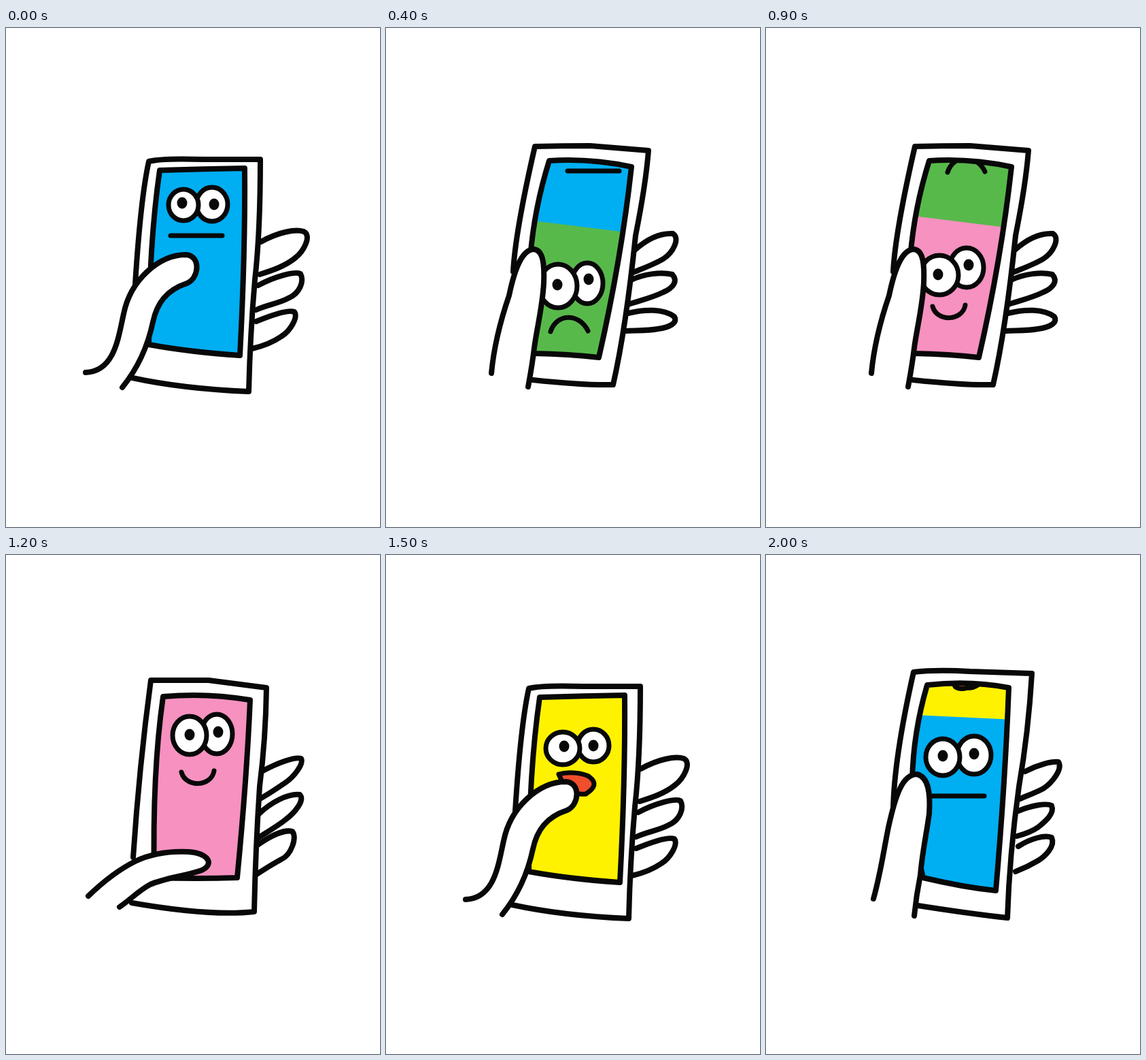
Write an HTML page with a canvas that moves like this. It is 550 px wide and 733 px high and loops after 2100 ms.

```html
<!DOCTYPE html>
<html lang="en">
<head>
<meta charset="utf-8">
<title>Swiping faces</title>
<style>
html, body { margin: 0; width: 100%; height: 100%; overflow: hidden; background: #fff; }
canvas { display: block; }
</style>
</head>
<body>
<canvas id="stage" width="550" height="733"></canvas>
<script>
const ctx = document.getElementById('stage').getContext('2d');
const INK = '#080808', RED = '#f04e2c';
const colors = ['#00aef2', '#58b94b', '#f691c0', '#fff200'];

// All poses share the same path commands, so any two can be blended.
const rest = {
  body: 'M190 376 Q198 250 210 196 Q230 191 290 193 L374 193 Q374 300 366 370 Q359 450 357 534 Q260 530 186 514',
  screen: 'M226 209 Q290 207 351 206 Q352 330 344 481 Q270 476 210 465 Q210 320 226 209Z',
  thumb: 'M117 506 C160 504 165 455 173 420 C183 370 225 333 265 333 C287 335 284 368 266 375 C236 385 222 404 216 432 C208 470 192 502 171 528',
  fingers: 'M375 314 C400 300 425 295 438 299 C450 305 438 328 425 338 C410 350 392 356 373 362 ' +
    'M371 378 C395 365 425 357 433 361 C439 372 432 390 415 397 C400 405 385 406 368 414 ' +
    'M368 431 C390 422 415 413 424 417 C430 425 418 445 405 453 C392 462 375 468 362 471'
};
const low = {
  body: 'M187 444 Q196 310 213 184 Q255 184 298 184 L383 195 Q382 270 373 340 Q367 430 365 524 Q300 531 185 511',
  screen: 'M231 208 Q295 202 359 213 Q354 330 340 474 Q280 476 218 474 Q215 320 231 208Z',
  thumb: 'M121 501 C150 473 170 460 190 450 C215 438 245 435 268 436 C296 438 308 453 288 463 C262 472 235 474 212 484 C195 493 182 507 167 517',
  fingers: 'M376 318 C400 305 425 296 434 299 C438 306 425 325 410 335 C395 345 385 352 372 359 ' +
    'M371 381 C390 363 415 350 432 352 C440 360 425 378 412 388 C400 398 385 406 370 416 ' +
    'M370 426 C390 412 410 403 421 406 C428 415 420 440 405 447 C390 455 378 463 367 470'
};
const push = {
  body: 'M186 385 Q198 250 213 177 Q260 178 300 181 L388 197 Q391 225 373 300 Q354 430 348 526 Q290 527 188 514',
  screen: 'M240 197 Q300 199 360 214 Q347 330 337 482 Q280 481 216 474 Q212 330 240 197Z',
  thumb: 'M139 496 C150 460 170 430 184 400 C196 368 215 333 236 333 C249 336 251 365 246 382 C238 405 226 425 218 452 C208 482 202 497 188 516',
  fingers: 'M372 322 C390 309 410 301 423 302 C432 312 420 328 405 336 C390 344 378 349 364 358 ' +
    'M366 380 C385 367 410 357 421 359 C427 370 415 388 402 395 C388 402 375 406 361 413 ' +
    'M361 431 C380 420 410 412 425 416 C431 428 415 442 402 447 C388 452 375 455 358 462'
};
const high = {
  body: 'M187 358 Q190 300 219 174 Q260 173 300 173 L386 180 Q382 230 367 305 Q353 440 334 524 Q290 525 216 517',
  screen: 'M240 195 Q300 191 361 204 Q346 340 313 484 Q270 479 217 478 Q196 335 240 195Z',
  thumb: 'M155 507 C159 465 170 425 181 393 C190 350 201 325 218 325 C232 327 233 350 232 375 C230 410 222 440 218 470 C215 495 213 505 209 527',
  fingers: 'M366 326 C385 309 405 301 422 302 C433 309 422 330 408 339 C395 347 378 353 361 360 ' +
    'M361 370 C380 361 405 358 421 362 C430 372 422 382 408 388 C392 396 375 400 356 406 ' +
    'M356 419 C380 413 408 412 424 424 C430 434 415 440 400 442 C385 445 365 444 352 445'
};
const finish = {
  body: 'M187 375 Q188 300 217 172 Q250 168 300 171 L391 174 Q386 260 372 340 Q358 440 355 533 Q300 527 217 514',
  screen: 'M237 191 Q300 184 357 195 Q352 330 338 493 Q290 488 231 474 Q196 330 237 191Z',
  thumb: 'M158 505 C168 470 172 440 180 400 C190 355 200 322 222 322 C239 326 242 350 240 380 C236 410 230 435 227 470 C222 495 220 510 218 530',
  fingers: 'M381 318 C400 308 420 303 430 304 C437 315 420 335 408 343 C395 350 385 353 374 358 ' +
    'M371 376 C390 368 412 364 420 368 C425 380 410 392 400 400 C390 407 380 410 369 413 ' +
    'M371 428 C390 416 410 411 420 415 C426 428 410 443 400 449 C390 455 380 460 367 465'
};

const midway = (a, b) => {
  const to = b.match(/\d+/g);
  let n = 0;
  return a.replace(/\d+/g, v => (+v + +to[n++]) / 2);
};
const between = {};
for (const part in rest) between[part] = midway(rest[part], low[part]);
const poses = [rest, between, low, push, high, finish];

// Mouth x, y, then each eye as x, y, rx, ry, pupil x, pupil y.
const looks = {
  start: [280, 305, 261, 260, 22, 23, 259, 257, 303, 259, 23, 25, 306, 259],
  rest: [280, 335, 260, 284, 25, 24, 262, 281, 305, 280, 23, 24, 305, 280],
  low: [282, 320, 270, 265, 25, 28, 270, 264, 310, 263, 23, 29, 312, 260],
  leaving: [293, 268, 282, 221, 25, 24, 285, 215, 328, 221, 23, 24, 326, 222],
  entering: [270, 520, 253, 454, 28, 26, 253, 450, 300, 460, 23, 25, 299, 457],
  high: [270, 437, 253, 379, 28, 32, 252, 377, 296, 375, 23, 30, 298, 369],
  highPink: [269, 410, 255, 363, 28, 29, 253, 362, 295, 352, 25, 29, 298, 348],
  finish: [283, 354, 260, 297, 25, 27, 260, 295, 306, 294, 25, 28, 306, 292]
};

const mouths = [
  'M-38 0L38 0',
  'M-28 9C-19 -19 15 -18 27 8',
  'M-24 -1C-18 22 20 21 24 -3',
  'M-18 6C-18 -3 -2 -4 2 -14C12 -14 20 -8 20 -2C20 8 10 12 2 11C-8 14 -18 12 -18 6Z',
  'M-26 -13C-10 -18 10 -14 18 -10C32 0 26 8 14 16Q-10 18 -20 0Z'
].map(d => new Path2D(d));

function draw(path, fill, width = 8) {
  if (fill) {
    ctx.fillStyle = fill;
    ctx.fill(path);
  }
  ctx.lineWidth = width;
  ctx.stroke(path);
}

function oval(x, y, rx, ry) {
  const path = new Path2D();
  path.ellipse(x, y, rx, ry, 0, 0, 7);
  return path;
}

function face(mouth, look) {
  const [mx, my, ...eyes] = look;
  ctx.save();
  ctx.translate(mx, my);
  draw(mouths[mouth], mouth > 2 && RED, 7);
  ctx.restore();
  for (const k of [6, 0]) {
    if (!eyes.length) break;
    const [x, y, rx, ry, px, py] = eyes.slice(k, k + 6);
    draw(oval(x, y, rx, ry), '#fff', 7);
    ctx.fillStyle = INK;
    ctx.fill(oval(px, py, 7.5, 8.5));
  }
}

function settledFace(step, phase, kind) {
  const first = step ? looks.rest : looks.start;
  if (phase === 0) return face(step && kind === 3 ? 4 : kind, first);
  face(kind, phase === 2 ? looks.low : first.map((v, n) => (v + looks.low[n]) / 2));
}

function slidingFaces(phase, kind) {
  const next = (kind + 1) % 4;
  const toPink = next === 2;
  const edge = phase === 3 ? [360, 379] : phase === 5 ? [234, 242] : toPink ? [274, 295] : [281, 302];
  const leaving = phase === 3 ? looks.leaving : phase === 5 ? [295, 184] : kind ? [295, 203] : [305, 210];
  const entering = phase === 3 ? looks.entering : phase === 5 ? looks.finish : toPink ? looks.highPink : looks.high;
  face(kind, leaving);
  ctx.fillStyle = colors[next];
  ctx.fill(new Path2D(`M200 ${edge[0]}L370 ${edge[1]}V510H200Z`));
  face(next, entering);
}

function render(step) {
  const last = step === 20;
  const phase = last ? 5 : step % 5;
  const kind = last ? 3 : Math.floor(step / 5);
  const pose = poses[phase];
  const screen = new Path2D(pose.screen);

  ctx.fillStyle = '#fff';
  ctx.fillRect(0, 0, 550, 733);
  ctx.strokeStyle = INK;
  ctx.lineCap = ctx.lineJoin = 'round';
  draw(new Path2D(pose.fingers), '#fff');
  draw(new Path2D(pose.body), '#fff');

  ctx.save();
  ctx.clip(screen);
  ctx.fillStyle = colors[kind];
  ctx.fillRect(150, 150, 300, 400);
  if (phase < 3) settledFace(step, phase, kind);
  else slidingFaces(phase, kind);
  ctx.restore();

  draw(screen);
  draw(new Path2D(pose.thumb), '#fff');
}

function tick() {
  render(Math.floor(performance.now() % 2100 / 100));
  requestAnimationFrame(tick);
}
tick();
</script>
</body>
</html>
```
